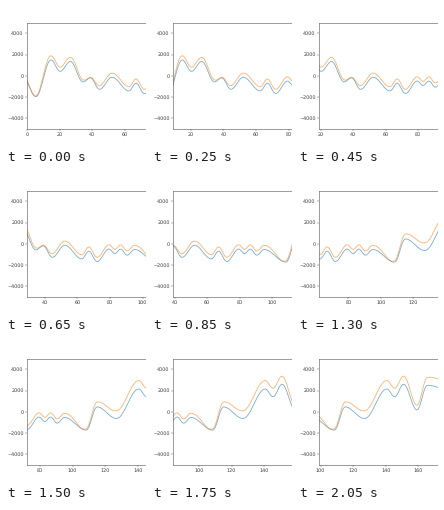
A matplotlib script that plays this animation: 140x140 px, repeating every 2100 ms.

```python
import numpy as np
import matplotlib.pyplot as plt
from matplotlib.animation import FuncAnimation
from matplotlib.ticker import MultipleLocator

SIZE, DPI = 140, 35
FRAMES, INTERVAL = 42, 50
WINDOW = 100

# Turning points of the lower curve: x, value in hundreds
TURNS = [
    (-3, 0), (5.5, -20), (14.7, 15), (20.3, 4), (26.7, 13.5), (34.4, -6),
    (39, -2), (44.5, -13), (52.2, -1.5), (62.7, -14.5), (67, -7), (72, -17),
    (79.4, -5), (83, -9.5), (86.5, -5), (90.5, -11), (95, -5.5),
    (108.5, -17.5), (115, 4.5), (127, -6.5), (140.7, 21.5), (145.5, 14),
    (151, 26), (159.2, 1.5), (165.5, 25), (200, 0),
]
DIPS = (4, 38, 106, 159)  # where the curves close up


def ease(t):
    return (1 - np.cos(np.pi * np.clip(t, 0, 1))) / 2


def wave(x):
    """Swing from each turning point to the next."""
    kx, ky = np.array(TURNS).T
    step, i = np.modf(np.interp(x, kx, np.arange(len(kx))))
    i = i.astype(int)
    return 100 * (ky[i] + ease(step) * (ky[i + 1] - ky[i]))


def gap(x):
    """Distance between the curves: wider later, closing at the dips."""
    closing = sum(np.exp(-((x - dip) / 5) ** 2) for dip in DIPS)
    return 400 * (1 + ease((x - 107) / 28) - 0.9 * closing)


plt.rcParams.update({
    "font.family": "DejaVu Sans", "text.hinting": "none",
    "axes.edgecolor": "0.35", "axes.linewidth": 1.2,
    "xtick.color": "0.25", "ytick.color": "0.25",
})
fig = plt.figure(figsize=(SIZE / DPI, SIZE / DPI), dpi=DPI, facecolor="white")
# The plot runs off the right side of the stage.
ax = fig.add_axes([21 / SIZE, 0.125, 162.75 / SIZE, 0.755])
ax.set_ylim(-5000, 5000)
ax.xaxis.set_major_locator(MultipleLocator(20))
ax.yaxis.set_major_locator(MultipleLocator(2000))

x = np.arange(0, 199.0)
lower = wave(x)
ax.plot(x, lower, color="C0", lw=1.7, alpha=0.6)
ax.plot(x, lower + gap(x), color="C1", lw=1.7, alpha=0.6)


def update(frame):
    left = max(frame, 5 * frame // 2 - 3)
    ax.set_xlim(left, left + WINDOW)
    return ax.lines


anim = FuncAnimation(fig, update, frames=FRAMES, interval=INTERVAL,
                     init_func=lambda: update(0), repeat=True, repeat_delay=0)
plt.show()
```
